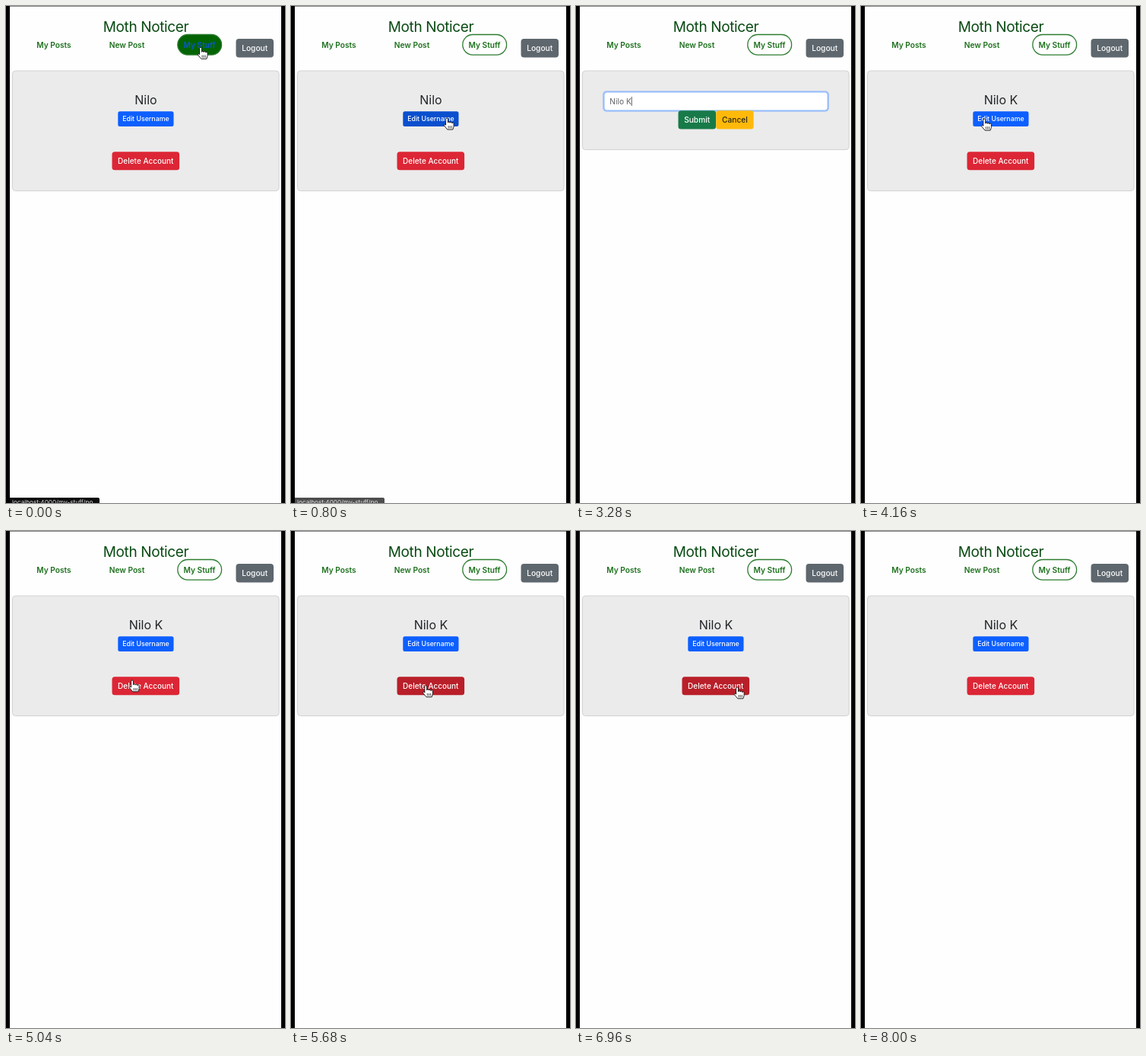
An HTML page for the animation above (8080 ms loop, 367 by 652 pixels).

```html
<!DOCTYPE html>
<html lang="en">
<head>
<meta charset="utf-8">
<style>
html, body { margin: 0; width: 100%; height: 100%; overflow: hidden; background: #000; }
svg { display: block; width: 367px; height: 652px; }
text { font: 10.2px Inter, sans-serif; text-anchor: middle; white-space: pre; }
.title { font-size: 19px; letter-spacing: -.02em; fill: #084a12; }
.nav { font-weight: 600; fill: #1c701c; }
.name { font-size: 16px; fill: #212529; }
.btn text { font-weight: 500; fill: #fff; }
.left { text-anchor: start; }
</style>
</head>
<body>
<svg viewBox="0 0 367 652">
  <path fill="#fefefe" d="M5 0h357v652H5z"/>
  <path fill="#8a8a8a" d="M5 0h357v1H5z"/>
  <text class="title" x="184" y="33.7">Moth Noticer</text>
  <text class="nav" x="63" y="54.5">My Posts</text>
  <text class="nav" x="159" y="54.5">New Post</text>
  <g id="stuff">
    <rect x="225.8" y="37.5" width="57.8" height="26.6" rx="13.3" stroke="#2c7c2f" stroke-width="1.3"/>
    <text class="nav" x="254.6" y="54.5">My Stuff</text>
  </g>
  <g class="btn">
    <rect x="302.5" y="43" width="49.5" height="24.5" rx="4" fill="#5e676e"/>
    <text x="327.2" y="59">Logout</text>
  </g>
  <rect id="card" x="8.5" y="85" width="350.5" rx="4" fill="#ebebeb" stroke="#d2d2d2"/>

  <g id="account">
    <text id="name" class="name" x="184" y="129"></text>
    <g id="edit" class="btn">
      <rect x="147.3" y="138.3" width="73.2" height="19.8" rx="2.5"/>
      <text x="183.9" y="151.4" style="font-size:8.8px">Edit Username</text>
    </g>
    <g id="remove" class="btn">
      <rect x="139.5" y="191.3" width="88.6" height="24" rx="3.5"/>
      <text x="183.8" y="207.3" style="font-size:10px">Delete Account</text>
    </g>
  </g>

  <g id="form">
    <rect id="ring" x="35" y="111.2" width="298" height="27.6" rx="5" fill="#a9c5f7"/>
    <rect id="field" x="37" y="113" width="294" height="24" rx="3.5" fill="#fff"/>
    <text id="typed" class="left" x="44.3" y="129"></text>
    <path id="caret" stroke="#333" stroke-width=".8" d="M0 119v12"/>
    <g id="submit" class="btn">
      <rect x="134.5" y="137.3" width="49.5" height="24.3" rx="3.5"/>
      <text x="159.2" y="153.4">Submit</text>
    </g>
    <g id="cancel" class="btn">
      <rect x="184.2" y="137.3" width="49.4" height="24.3" rx="3.5"/>
      <text x="209" y="153.4" style="fill:#2b2410">Cancel</text>
    </g>
  </g>

  <g id="status">
    <path fill="#0c0c0c" d="M5 645h116q2 0 2 2v5H5z"/>
    <text class="left" x="8" y="654" style="font-size:8.2px" fill="#ddd">localhost:4000/my-stuff/po</text>
  </g>

  <g id="cursor" stroke-linejoin="round" stroke-linecap="round">
    <g id="hand" stroke="#111" fill="#fff" transform="scale(.95 .9)">
      <path d="M-1.5 9.5V1.2a1.5 1.5 0 0 1 3 0V6.5a1.4 1.4 0 0 1 2.8 .3a1.4 1.4 0 0 1 2.8 .6a1.3 1.3 0 0 1 2.5 .8V12L8.3 16.5H.8L-4 10.5a1.5 1.5 0 0 1 2.5-1z"/>
      <path stroke-width=".8" d="M2.2 11.5v3M4.4 11.5v3M6.6 11.5v3"/>
    </g>
    <path id="arrow" fill="#111" stroke="#fff" d="M0 0V13L3 10.3 5 15 7.2 14 5.2 9.5H9.2z"/>
    <path id="beam" fill="none" stroke="#222" stroke-width="1.2" d="M-3-7.5q3 0 3 2V5.5q0 2-3 2M3-7.5q-3 0-3 2M3 7.5q-3 0-3-2M-2 2h4"/>
  </g>
</svg>
<script>
const LOOP = 8080, STEP = 80;
const OPEN = 1040, FOCUS = 1840, SAVE = 4160;
const NAME = "Nilo", NEW_NAME = "Nilo K";
const KEY_TIMES = [2400, 2480, 2560, 2960, 3120, 3280];

// time, x, y of the pointer tip
const PATH = [
  [0, 256, 54.5], [160, 255, 57], [640, 207, 144], [800, 205, 147.2], [1200, 204, 148],
  [1680, 132, 131], [3360, 132, 131], [3920, 162, 148], [4640, 163, 149],
  [4960, 166, 186], [5040, 166, 196], [5520, 174, 201], [6240, 200, 216.3],
  [6480, 200, 216], [6960, 212, 205], [7120, 212, 205], [7440, 236, -9], [8080, 236, -9]
];

// idle and hover colours
const COLORS = {
  stuff: ["#fefefe", "#046404"],
  edit: ["#0d5fff", "#0a4fce"],
  remove: ["#dc2635", "#b91f29"],
  submit: ["#187a48", "#126039"],
  cancel: ["#ffb90a", "#ffc534"]
};

const $ = id => document.getElementById(id);
const show = (id, on) => $(id).style.display = on ? "" : "none";
const clamp = v => Math.max(0, Math.min(1, v));
const editing = t => t >= OPEN && t < SAVE;

function pointer(t) {
  const i = Math.max(1, PATH.findIndex(p => p[0] >= t));
  const [t0, x0, y0] = PATH[i - 1], [t1, x1, y1] = PATH[i];
  const k = clamp((t - t0) / (t1 - t0)), e = k * k * (3 - 2 * k);
  return [x0 + (x1 - x0) * e, y0 + (y1 - y0) * e];
}

function hit(t) {
  const [x, y] = pointer(t);
  const ids = editing(t) ? ["stuff", "submit", "cancel", "field"] : ["stuff", "edit", "remove"];
  return ids.find(id => {
    const r = ($(id).querySelector("rect") || $(id)).getBBox();
    return x >= r.x && x <= r.x + r.width && y >= r.y && y <= r.y + r.height + 1.5;
  });
}

function draw(t) {
  const form = editing(t), over = hit(t), lit = hit(Math.max(0, t - STEP));
  const typing = t >= KEY_TIMES[0] && t < 3360;
  show("account", !form);
  show("form", form);
  $("card").setAttribute("height", form ? 103.5 : 157.5);
  $("name").textContent = t < SAVE ? NAME : NEW_NAME;

  for (const id in COLORS)
    $(id).querySelector("rect").setAttribute("fill", COLORS[id][+(lit === id)]);
  $("stuff").querySelector("text").style.fill = lit === "stuff" ? "#0a58ca" : "";

  const keys = KEY_TIMES.filter(k => t >= k).length;
  $("typed").textContent = keys ? NEW_NAME.slice(0, keys) : NAME;
  $("typed").style.fill = keys ? "#5f6368" : "#777c81";
  $("ring").setAttribute("opacity", clamp((t - FOCUS + STEP) / 160));
  $("field").setAttribute("stroke", t < FOCUS ? "#ced4da" : "#86b7fe");
  if (form) {
    const end = keys ? $("typed").getComputedTextLength() : 0;
    $("caret").setAttribute("transform", `translate(${44.8 + end})`);
    show("caret", t >= FOCUS);
  }

  $("status").setAttribute("opacity", clamp((1040 - t) / 330));

  const [x, y] = pointer(t);
  $("cursor").setAttribute("transform", `translate(${x} ${y})`);
  show("cursor", !typing && t < 7600);
  show("beam", over === "field");
  show("arrow", !over);
  show("hand", over && over !== "field");
}

function tick(now) {
  draw(Math.floor(now % LOOP / STEP) * STEP);
  requestAnimationFrame(tick);
}
draw(0);
requestAnimationFrame(tick);
</script>
</body>
</html>
```
